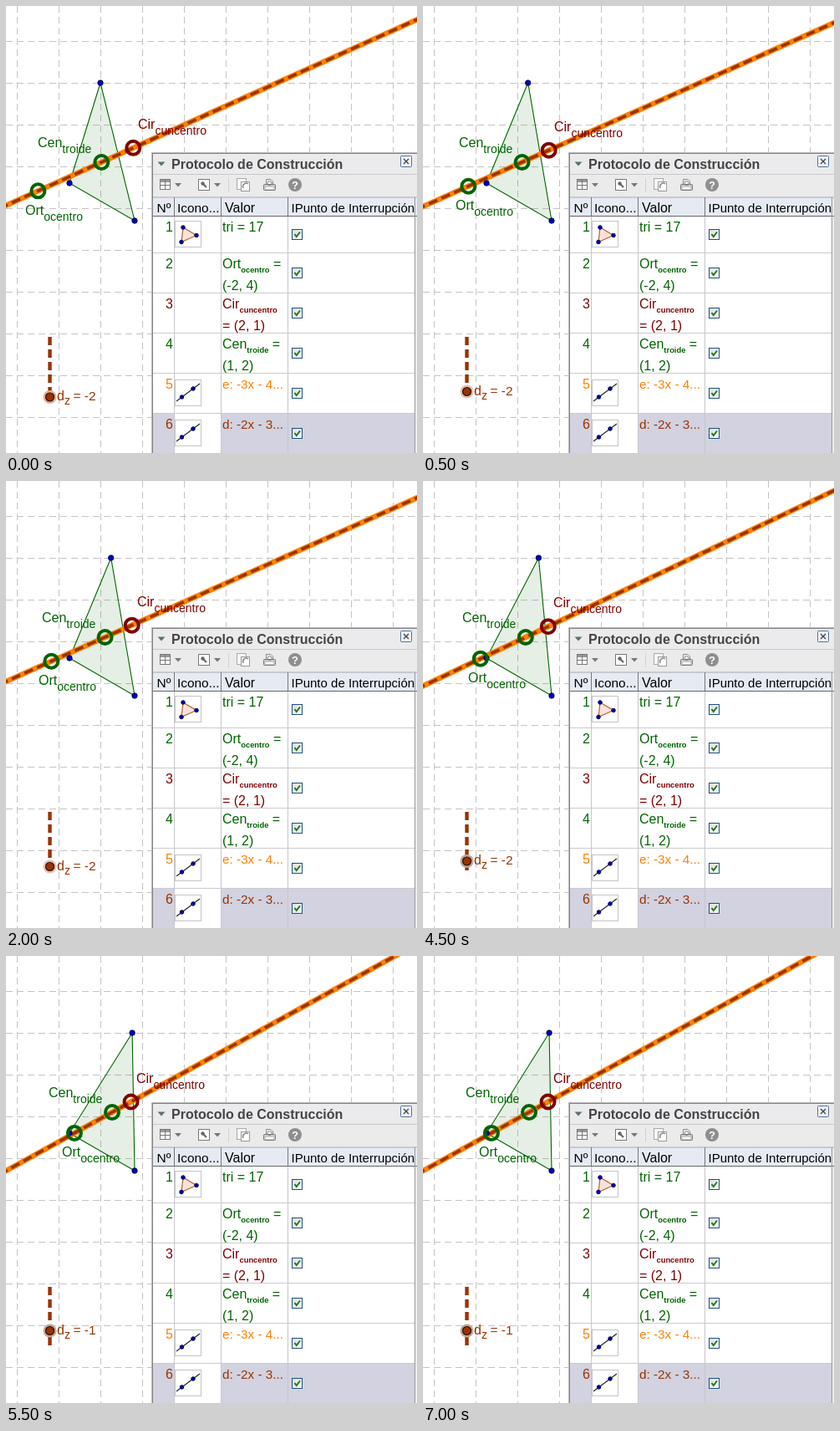
An HTML page for the animation above (8 s loop, 492 px wide and 535 px high).

```html
<!DOCTYPE html>
<html lang="es">
<head>
<meta charset="utf-8">
<title>Recta de Euler</title>
<style>
html, body { margin: 0; width: 100%; height: 100%; overflow: hidden; background: #fff; }
svg { display: block; width: 492px; height: 535px; font: 16px "Liberation Sans", Arial, sans-serif; }
text { white-space: pre; }
</style>
</head>
<body>
<svg id="stage" viewBox="0 0 492 535" xmlns="http://www.w3.org/2000/svg">
  <defs>
    <linearGradient id="box" x1="0" y1="0" x2="1" y2="1">
      <stop offset="0" stop-color="#dcdcd7"/><stop offset="1" stop-color="#fff"/>
    </linearGradient>
  </defs>
  <g id="grid" stroke="#c4c4c4" stroke-dasharray="8 5"></g>
  <g id="plot"></g>
  <g id="panel"></g>
</svg>
<script>
const NS = 'http://www.w3.org/2000/svg';
const $ = id => document.getElementById(id);
const GREEN = '#006400', MAROON = '#7f0000', BROWN = '#993300', ORANGE = '#ff8000', BLUE = '#0000c8';

function add(parent, tag, attrs, text) {
  const el = document.createElementNS(NS, tag);
  set(el, attrs);
  if (text !== undefined) el.textContent = text;
  parent.appendChild(el);
  return el;
}
function set(el, attrs) {
  for (const k in attrs) el.setAttribute(k, attrs[k]);
}

// Name whose tail is written as a subscript
function label(parent, head, tail, fill, sub = { 'font-size': 14 }, drop = 6.5) {
  const el = add(parent, 'text', { fill });
  add(el, 'tspan', {}, head);
  add(el, 'tspan', { dy: drop, ...sub }, tail);
  return el;
}
const move = (el, x, y) => el.setAttribute('transform', `translate(${x} ${y})`);

// Grid
for (let x = 13.5; x < 492; x += 50) add($('grid'), 'path', { d: `M${x} 0V535` });
for (let y = 42.5; y < 535; y += 50) add($('grid'), 'path', { d: `M0 ${y}H492` });

// Construction
const B = [76, 212], C = [154, 257];
const plot = $('plot');
const tri = add(plot, 'polygon', { fill: GREEN, 'fill-opacity': .1, stroke: GREEN, 'stroke-width': 1.1 });
const solid = add(plot, 'path', { stroke: ORANGE, 'stroke-width': 6.5 });
const dashed = add(plot, 'path', { stroke: BROWN, 'stroke-width': 3.6, 'stroke-dasharray': '11 5.5' });
const dot = (parent, cx, cy, r = 3.2) =>
  add(parent, 'circle', { cx, cy, r, fill: BLUE, stroke: '#000040', 'stroke-width': .9 });
const apex = dot(plot, 0, 92);
dot(plot, ...B);
dot(plot, ...C);
const ring = color => add(plot, 'circle', { r: 8, fill: 'none', stroke: color, 'stroke-width': 4 });
const rings = { G: ring(GREEN), H: ring(GREEN), O: ring(MAROON) };
const names = {
  G: label(plot, 'Cen', 'troide', GREEN),
  H: label(plot, 'Ort', 'ocentro', GREEN),
  O: label(plot, 'Cir', 'cuncentro', MAROON)
};
const offset = { G: [-76, -18], H: [-15, 28.5], O: [6, -23] };

// Slider
add(plot, 'path', { d: 'M52.5 396V468.5', stroke: BROWN, 'stroke-width': 4.4, 'stroke-dasharray': '10 5' });
const knob = add(plot, 'g', {});
const halo = add(knob, 'circle', { r: 8 });
add(knob, 'circle', { r: 5, fill: BROWN, stroke: '#2b0e00', 'stroke-width': 1.2 });
move(label(knob, 'd', 'z', BROWN, { 'font-size': 14 }, 5), 8.5, 4);
const value = add(knob, 'text', { x: 28, y: 4, fill: BROWN, 'font-size': 15.5 });

// Panel
const panel = $('panel');
const rect = (x, y, width, height, fill, more = {}) =>
  add(panel, 'rect', { x, y, width, height, fill, ...more });
const path = (d, more) => add(panel, 'path', { d, fill: 'none', ...more });
const write = (x, y, s, fill = '#000', size = 16, more = {}) =>
  add(panel, 'text', { x, y, fill, 'font-size': size, ...more }, s);

rect(174, 175, 318, 360, '#b8b8b8');
rect(175, 176, 317, 359, '#858585');
rect(176, 177, 316, 358, '#fff');
rect(176, 177, 316, 24, '#ebebed');
rect(176, 201, 316, 28, '#ebebeb');
path('M176 201.5H492', { stroke: '#c8c8c8' });
path('M181.500 186.500H190.500L186 191.500Z', { fill: '#5c7264' });
write(198, 195, 'Protocolo de Construcción', '#444', 16, { 'font-weight': 'bold' });
rect(472.5, 179.5, 13, 13, '#eef2f8', { stroke: '#56719c', rx: 1 });
path('M476 183L482 189M482 183L476 189', { stroke: '#444', 'stroke-width': 1.4 });

// Toolbar
rect(184.5, 207.5, 12, 12, '#fff', { stroke: '#777' });
rect(185, 208, 11, 3, '#999');
path('M190.500 208V219M185 214.500H196', { stroke: '#777' });
for (const x of [206, 253]) path(`M${x - 4} 212H${x + 4}L${x} 216.500Z`, { fill: '#777' });
rect(230.5, 207.5, 13, 13, '#fff', { stroke: '#777' });
path('M235 212L240 217', { stroke: '#666', 'stroke-width': 2.2 });
add(panel, 'circle', { cx: 235.5, cy: 212.5, r: 2.2, fill: '#666' });
path('M266.500 206V223', { stroke: '#d2d2d2' });
rect(276.5, 206.5, 11, 13, '#f6f6f6', { stroke: '#aaa' });
rect(281.5, 210.5, 10, 11, '#fff', { stroke: '#999' });
path('M284 218A4 4 0 0 1 290 213', { stroke: '#888', 'stroke-width': 1.5 });
path('M311.500 213V207.500H317L319.500 210V213', { fill: '#fff', stroke: '#888' });
rect(308.5, 213.5, 14, 7, '#c9c9c9', { stroke: '#777', rx: 1 });
path('M311 218H320', { stroke: '#fff', 'stroke-width': 2 });
add(panel, 'circle', { cx: 315.5, cy: 212, r: 2.5, fill: 'none', stroke: '#777' });
add(panel, 'circle', { cx: 346, cy: 214, r: 8, fill: '#8e8e8e' });
write(346, 219, '?', '#fff', 13, { 'font-weight': 'bold', 'text-anchor': 'middle' });

// Table
rect(176, 229, 316, 22, '#e6ebf3');
rect(176, 487, 316, 48, '#d2d2e0');
rect(202, 488, 55, 47, '#fff');
path('M176 229H492', { stroke: '#a8a8b0' });
path('M176 251.500H492', { stroke: '#666' });
for (const y of [295.5, 343.5, 391.5, 439.5, 487.5]) path(`M176 ${y}H489`, { stroke: '#cbcbd0' });
for (const x of [201.5, 257.5, 337.5]) {
  path(`M${x} 252V535`, { stroke: '#c6c6cc' });
  path(`M${x} 229V251`, { stroke: '#777' });
}
rect(490, 252, 2, 283, '#ededed');
path('M489.500 229V535', { stroke: '#999' });
write(180.5, 247, 'Nº', '#000', 15.5);
write(205, 247, 'Icono...', '#000', 15.4);
write(262, 247, 'Valor');
write(341.5, 247, 'IPunto de Interrupción', '#000', 15);

const iconBox = y => rect(202.5, y + .5, 31, 31, '#fff', { stroke: '#c4c4c8' });
function lineIcon(y) {
  iconBox(y);
  path(`M204 ${y + 26}L232 ${y + 5}`, { stroke: '#222', 'stroke-width': 1.2 });
  dot(panel, 210.5, y + 21, 2.3);
  dot(panel, 224, y + 11, 2.3);
}
iconBox(257);
path('M212 265L228 274.500L210 282.500Z', { fill: '#f5e3dc', stroke: '#b8602c', 'stroke-width': 1.2 });
for (const [x, y] of [[212, 265], [228, 274.5], [210, 282.5]]) dot(panel, x, y, 2.3);
lineIcon(447);
lineIcon(495);

const rows = [
  [270, GREEN, 'tri = 17'],
  [314, GREEN, 'Ort', 'ocentro', ' =', '(-2, 4)'],
  [362, MAROON, 'Cir', 'cuncentro', '', '= (2, 1)'],
  [410, GREEN, 'Cen', 'troide', ' =', '(1, 2)'],
  [458, ORANGE, 'e: -3x - 4...'],
  [506, BROWN, 'd: -2x - 3...']
];
const tiny = { 'font-size': 9.4, 'font-weight': 'bold' };
rows.forEach(([y, color, head, tail, eq, second], i) => {
  write(200, y, i + 1, color, 16, { 'text-anchor': 'end' });
  if (tail) {
    const name = label(panel, head, tail, color, tiny, 5);
    move(name, 259, y);
    add(name, 'tspan', { dy: -5 }, eq);
    write(259, y + 26, second, color);
  } else {
    write(259, y, head, color, i > 3 ? 15.3 : 16);
  }
  const cy = i ? 271 + 48 * i : 273;
  rect(342.5, cy - 5.5, 12, 12, 'url(#box)', { stroke: '#1c5180' });
  path(`M345.500 ${cy}L347.700 ${cy + 3}L352 ${cy - 2.5}`, { stroke: '#1f7a1f', 'stroke-width': 2 });
});

// Circumcentre of three points
function circum([ax, ay], [bx, by], [cx, cy]) {
  const d = 2 * (ax * (by - cy) + bx * (cy - ay) + cx * (ay - by));
  const a = ax * ax + ay * ay, b = bx * bx + by * by, c = cx * cx + cy * cy;
  return [
    (a * (by - cy) + b * (cy - ay) + c * (ay - by)) / d,
    (a * (cx - bx) + b * (ax - cx) + c * (bx - ax)) / d
  ];
}

const halos = ['#dcb09c', '#e0c0b2', '#bda59a', '#c4a598'];
let shown = -1;

function draw(step) {
  const A = [113 + 12.7 * step, 92];
  const O = circum(A, B, C);
  const G = [0, 1].map(i => (A[i] + B[i] + C[i]) / 3);
  const H = [0, 1].map(i => 3 * G[i] - 2 * O[i]);
  const slope = (O[1] - G[1]) / (O[0] - G[0]);
  const at = x => G[1] + slope * (x - G[0]);
  const d = `M-8 ${at(-8)}L500 ${at(500)}`;
  set(tri, { points: [A, B, C].join(' ') });
  set(solid, { d });
  set(dashed, { d });
  set(apex, { cx: A[0] });
  const centres = { G, H, O };
  for (const k in centres) {
    const [x, y] = centres[k];
    set(rings[k], { cx: x, cy: y });
    move(names[k], Math.round(x + offset[k][0]), Math.round(y + offset[k][1]));
  }
  move(knob, 52.5, 468 - 6.5 * step);
  set(halo, { fill: halos[step] });
  value.textContent = step < 3 ? '= -2' : '= -1';
}

function tick() {
  const t = performance.now() % 8000;
  const step = t < 500 ? 0 : 1 + Math.floor((t - 500) / 2500);
  if (step !== shown) draw(shown = step);
  requestAnimationFrame(tick);
}
tick();
</script>
</body>
</html>
```
